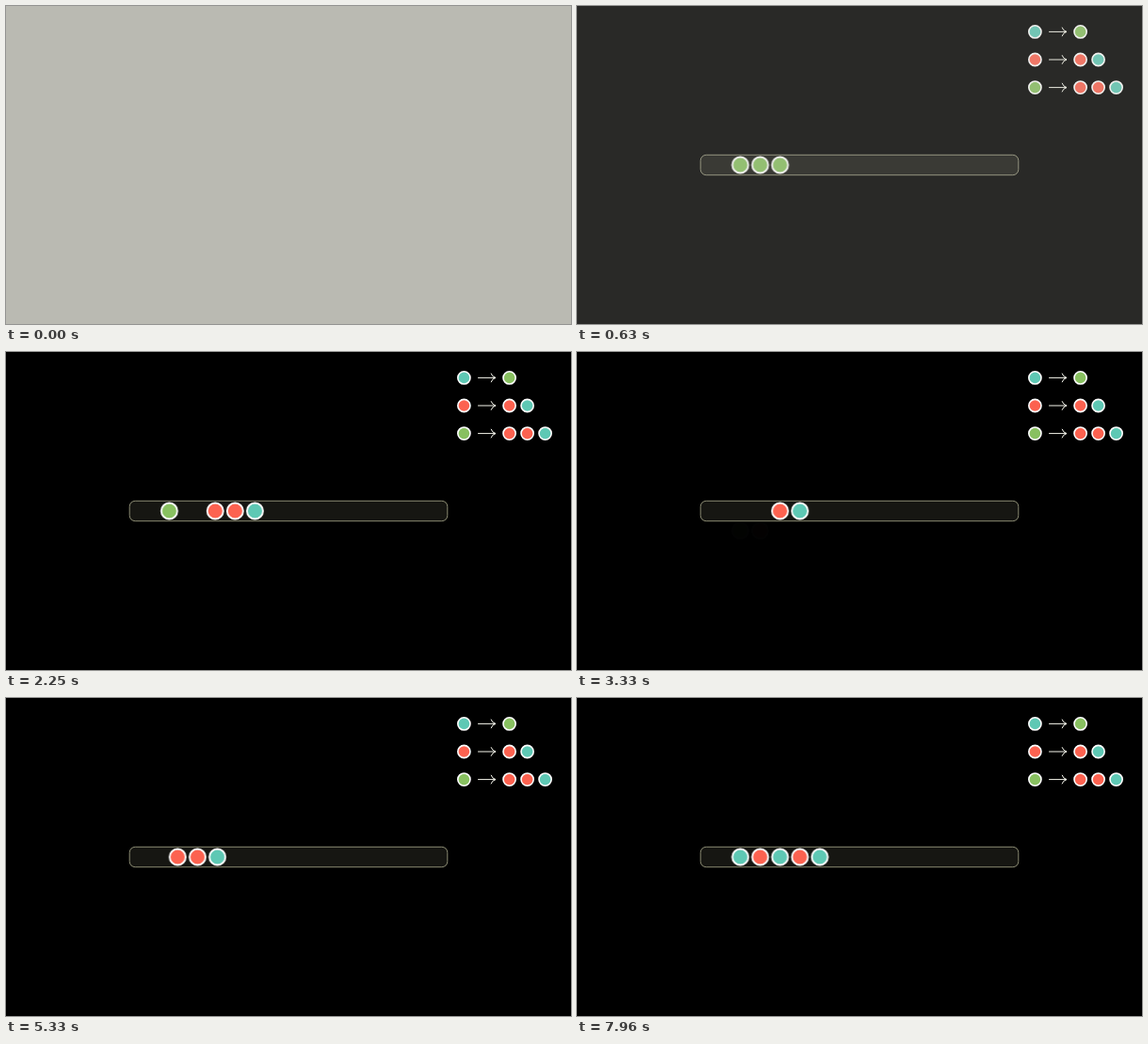
Animation, 600 px wide and 338 px high, one loop 8000 ms. Source, as an HTML page without scripts:

```html
<!DOCTYPE html>
<html lang="en">
<head>
<meta charset="utf-8">
<title>Tag system</title>
<style>
  html, body { margin: 0; width: 100%; height: 100%; overflow: hidden; background: #000; }
  svg { display: block; width: 100%; height: 100%; }

  .red { fill: #fc6250; }
  .green { fill: #88c060; }
  .teal { fill: #5ec8b4; }
  .arrow { fill: none; stroke: #f6f6ec; stroke-width: 1; stroke-linecap: round; }
  .bar { fill: #161612; stroke: #8a8a72; }
  .veil { fill: #babab2; }

  .veil, .row, .in, .out {
    animation: 8s cubic-bezier(.6, 0, .4, 1) infinite;
  }

  /* opening fade */
  .veil { animation-name: veil; }
  @keyframes veil { 0% { opacity: 1 } 12.5%, to { opacity: 0 } }

  /* queue closes up by two places per step */
  .row { animation-name: row; }
  @keyframes row {
    0%, 20.5% { transform: none }
    24.25%, 42.375% { transform: translateX(-42.2px) }
    46.125%, 64.25% { transform: translateX(-84.4px) }
    68%, 86.125% { transform: translateX(-126.6px) }
    89.875%, to { transform: translateX(-168.8px) }
  }

  /* the first two symbols drop out */
  .o1 { animation-name: out1; }
  .o2 { animation-name: out2; }
  .o3 { animation-name: out3; }
  .o4 { animation-name: out4; }
  @keyframes out1 { 0%, 14.25% { transform: none; opacity: 1 } 20.5%, to { transform: translateY(21.1px); opacity: 0 } }
  @keyframes out2 { 0%, 36.125% { transform: none; opacity: 1 } 42.375%, to { transform: translateY(21.1px); opacity: 0 } }
  @keyframes out3 { 0%, 58% { transform: none; opacity: 1 } 64.25%, to { transform: translateY(21.1px); opacity: 0 } }
  @keyframes out4 { 0%, 79.875% { transform: none; opacity: 1 } 86.125%, to { transform: translateY(21.1px); opacity: 0 } }

  /* new symbols slide in from the right end */
  .in { --from: translateX(200px); }
  .i1 { animation-name: in1; --from: translateX(221px); }
  .i2 { animation-name: in2; }
  .i3 { animation-name: in3; }
  .i4 { animation-name: in4; }
  @keyframes in1 { 0%, 23.75% { transform: var(--from); opacity: 0 } 25% { opacity: 1 } 30%, to { transform: none; opacity: 1 } }
  @keyframes in2 { 0%, 45.625% { transform: var(--from); opacity: 0 } 46.9% { opacity: 1 } 51.875%, to { transform: none; opacity: 1 } }
  @keyframes in3 { 0%, 67.5% { transform: var(--from); opacity: 0 } 68.75% { opacity: 1 } 73.75%, to { transform: none; opacity: 1 } }
  @keyframes in4 { 0%, 89.375% { transform: var(--from); opacity: 0 } 90.6% { opacity: 1 } 95.625%, to { transform: none; opacity: 1 } }
</style>
</head>
<body>
<svg viewBox="0 0 600 338" preserveAspectRatio="none">
  <defs>
    <circle id="dot" r="8.5" stroke="#fff" stroke-width="1.9"/>
    <circle id="mini" r="6.6" stroke="#fff" stroke-width="1.6"/>
    <path id="arrow" class="arrow" d="M501.5 0H519.5M515.2 -4.4Q516.2 -1 520 0Q516.2 1 515.2 4.4"/>
  </defs>

  <rect width="600" height="338"/>

  <!-- rules -->
  <g transform="translate(0 27.4)">
    <use href="#mini" class="teal" x="486.4"/>
    <use href="#arrow"/>
    <use href="#mini" class="green" x="534.6"/>
  </g>
  <g transform="translate(0 57)">
    <use href="#mini" class="red" x="486.4"/>
    <use href="#arrow"/>
    <use href="#mini" class="red" x="534.6"/>
    <use href="#mini" class="teal" x="553.6"/>
  </g>
  <g transform="translate(0 86.6)">
    <use href="#mini" class="green" x="486.4"/>
    <use href="#arrow"/>
    <use href="#mini" class="red" x="534.6"/>
    <use href="#mini" class="red" x="553.6"/>
    <use href="#mini" class="teal" x="572.6"/>
  </g>

  <rect class="bar" x="131.2" y="158.3" width="337.6" height="21.4" rx="6"/>

  <!-- queue, 21.1 per place -->
  <g transform="translate(173.4 169)">
    <g class="row">
      <g class="out o1"><use href="#dot" class="green"/></g>
      <g class="out o1"><use href="#dot" class="green" x="21.1"/></g>
      <g class="out o2"><use href="#dot" class="green" x="42.2"/></g>
      <g class="in i1">
        <g class="out o2"><use href="#dot" class="red" x="63.3"/></g>
        <g class="out o3"><use href="#dot" class="red" x="84.4"/></g>
        <g class="out o3"><use href="#dot" class="teal" x="105.5"/></g>
      </g>
      <g class="in i2">
        <g class="out o4"><use href="#dot" class="red" x="126.6"/></g>
        <g class="out o4"><use href="#dot" class="red" x="147.7"/></g>
        <use href="#dot" class="teal" x="168.8"/>
      </g>
      <g class="in i3">
        <use href="#dot" class="red" x="189.9"/>
        <use href="#dot" class="teal" x="211"/>
      </g>
      <g class="in i4">
        <use href="#dot" class="red" x="232.1"/>
        <use href="#dot" class="teal" x="253.2"/>
      </g>
    </g>
  </g>

  <rect class="veil" width="600" height="338"/>
</svg>
</body>
</html>
```
